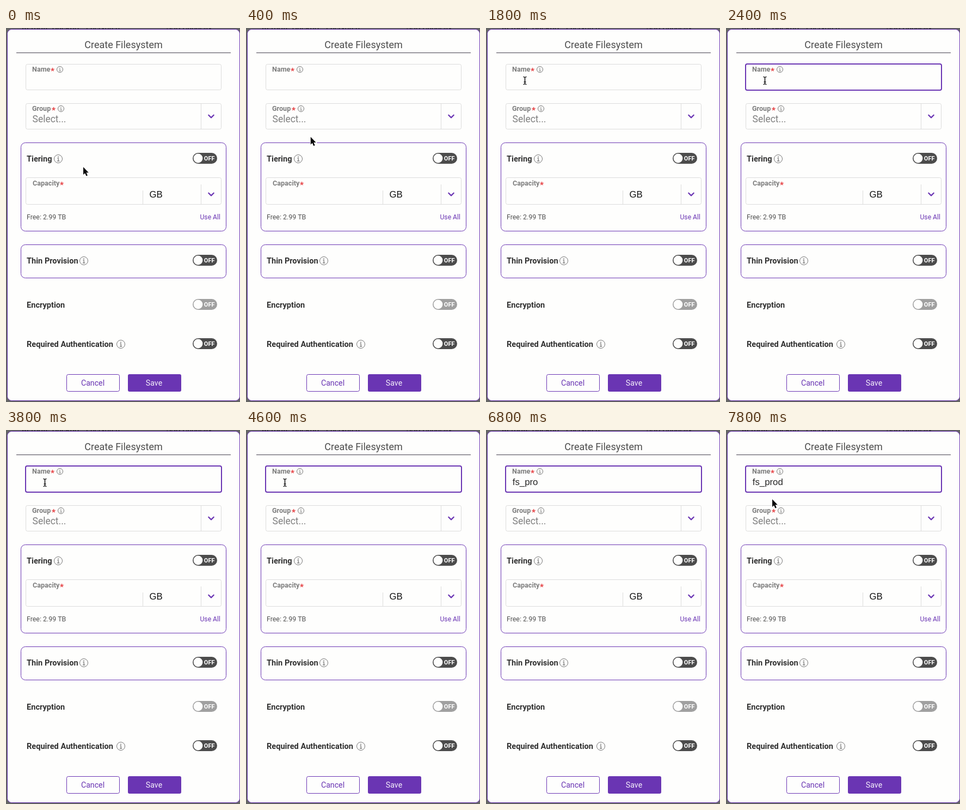
An HTML page with a canvas for the animation above (8000 ms loop, 430 by 686 pixels).

```html
<!DOCTYPE html>
<html lang="en">
<head>
<meta charset="utf-8">
<title>Create Filesystem</title>
<style>
  html, body { margin: 0; width: 100%; height: 100%; overflow: hidden; background: #656565; }
  canvas { display: block; width: 430px; height: 686px; }
</style>
</head>
<body>
<canvas id="stage"></canvas>
<script>
const W = 430, H = 686, LOOP = 8000, STEP = 200;
const PURPLE = '#6a35b3', DARK = '#4c4c4c', LABEL = '#7d7d7d', LINE = '#dcdcdc', PAPER = '#fefefd';
const UI = 'Roboto, "Open Sans", sans-serif';
const INPUT = '"Liberation Sans", Arial, sans-serif';

const canvas = document.getElementById('stage');
const ctx = canvas.getContext('2d');
const dpr = window.devicePixelRatio || 1;
canvas.width = W * dpr;
canvas.height = H * dpr;
ctx.scale(dpr, dpr);

function text(str, x, y, size, color, { weight = 400, family = UI, align = 'left' } = {}) {
  ctx.font = `${weight} ${size}px ${family}`;
  ctx.textAlign = align;
  ctx.fillStyle = color;
  ctx.fillText(str, x, y);
}

function box(x, y, w, h, r, { stroke, fill, width = 1 }) {
  ctx.beginPath();
  ctx.roundRect(x, y, w, h, r);
  if (fill) { ctx.fillStyle = fill; ctx.fill(); }
  if (stroke) { ctx.strokeStyle = stroke; ctx.lineWidth = width; ctx.stroke(); }
}

function polyline(points, color, width) {
  ctx.beginPath();
  points.forEach(([x, y]) => ctx.lineTo(x, y));
  ctx.strokeStyle = color;
  ctx.lineWidth = width;
  ctx.stroke();
}

function disc(x, y, r, color) {
  ctx.beginPath();
  ctx.arc(x, y, r, 0, Math.PI * 2);
  ctx.fillStyle = color;
  ctx.fill();
}

function info(x, y, r) {
  const s = r / 7.5;
  ctx.beginPath();
  ctx.arc(x, y, r, 0, Math.PI * 2);
  ctx.strokeStyle = '#777';
  ctx.lineWidth = 1;
  ctx.stroke();
  disc(x, y - 3.5 * s, 0.9 * s, '#666');
  polyline([[x - 1.6 * s, y - 1 * s], [x + 0.2 * s, y - 1 * s], [x + 0.2 * s, y + 4 * s]], '#666', 1.1 * s);
  polyline([[x - 2 * s, y + 4 * s], [x + 2.4 * s, y + 4 * s]], '#666', 1.1 * s);
}

function label(str, x, y, starX) {
  text(str, x, y, 12.6, LABEL, { weight: 700 });
  text('*', starX, y + 3.5, 15.5, '#e5383b', { weight: 700, align: 'center' });
}

function heading(str, y, iconX) {
  text(str, 38, y, 14.6, '#303030', { weight: 700 });
  if (iconX) info(iconX, y - 5, 7.5);
}

function chevron(x, y) {
  ctx.lineCap = ctx.lineJoin = 'round';
  polyline([[x - 4.7, y - 2.2], [x, y + 2.4], [x + 4.7, y - 2.2]], PURPLE, 2.3);
  ctx.lineCap = 'butt';
  ctx.lineJoin = 'miter';
}

function toggle(y, color) {
  box(343, y - 10, 45, 20, 10, { fill: color });
  disc(353, y, 8.4, PAPER);
  text('OFF', 373.7, y + 4, 11, '#fff', { weight: 700, align: 'center' });
}

function backdrop() {
  ctx.fillStyle = '#656565';
  ctx.fillRect(0, 0, W, H);
  text('Remote Backup', 29, 4, 15, '#2c2c2c');
  text('Encrypted', 147, 4, 14, '#2c2c2c');
  text('SSD Capacity', 295, 4, 14, '#2c2c2c');
  box(2.5, 2.5, 427, 681, 8, { fill: PAPER, stroke: PURPLE });
}

function form(focused, name) {
  text('Create Filesystem', 216, 37, 18, DARK, { align: 'center' });
  polyline([[19, 45.5], [413, 45.5]], '#45404f', 1);

  if (focused) box(36, 66, 360, 48, 3, { stroke: PURPLE, width: 2 });
  else box(36.5, 66.5, 359, 47, 3, { stroke: LINE });
  label('Name', 48, 80, 85.6);
  info(99, 76, 5.5);
  text(name, 48.8, 101, 16.8, '#262626', { family: INPUT });

  box(36.5, 138.5, 359, 47, 3, { stroke: LINE });
  polyline([[358.5, 138], [358.5, 186]], LINE, 1);
  label('Group', 48, 152, 87.6);
  info(101, 148, 5.5);
  text('Select...', 48.5, 173, 17.5, '#808080');
  chevron(377, 162);

  box(27.5, 210.5, 377, 162, 8, { stroke: PURPLE });
  heading('Tiering', 245, 96);
  toggle(239, DARK);
  box(36.5, 274.5, 359, 49, 3, { stroke: LINE });
  polyline([[251.5, 298], [251.5, 323]], LINE, 1);
  polyline([[358.5, 287], [358.5, 323]], LINE, 1);
  label('Capacity', 49, 289, 102.6);
  text('GB', 263.5, 311, 16.8, '#111', { family: INPUT });
  chevron(377, 305);
  text('Free: 2.99 TB', 38, 351, 12.4, '#505050');
  text('Use All', 394, 351, 12.2, PURPLE, { align: 'right' });

  box(27.5, 397.5, 377, 61, 8, { stroke: PURPLE });
  heading('Thin Provision', 432, 143);
  toggle(426, DARK);
  heading('Encryption', 513);
  toggle(507, '#a0a0a0');
  heading('Required Authentication', 585, 211);
  toggle(579, DARK);

  box(111.5, 635.5, 97, 31, 3, { stroke: PURPLE });
  text('Cancel', 159.5, 656, 14.2, PURPLE, { align: 'center' });
  box(224, 635, 98, 32, 3, { fill: PURPLE });
  text('Save', 272, 656, 14.2, '#f4effa', { align: 'center' });
}

function arrow(x, y) {
  const shape = [[0, 0], [0, 14], [3.1, 11.2], [5.5, 16.6], [7.9, 15.6], [5.6, 10.3], [9.8, 10.3]];
  ctx.beginPath();
  shape.forEach(([dx, dy]) => ctx.lineTo(x + dx, y + dy));
  ctx.closePath();
  ctx.strokeStyle = '#fff';
  ctx.lineWidth = 2;
  ctx.stroke();
  ctx.fillStyle = '#0a0a0a';
  ctx.fill();
}

function beam(x, y) {
  for (const [color, width] of [['#fff', 3], ['#111', 1.3]]) {
    polyline([[x - 3, y - 7], [x - 1.2, y - 6.7], [x, y - 5.5], [x, y + 5.5], [x - 1.2, y + 6.7], [x - 3, y + 7]], color, width);
    polyline([[x + 3, y - 7], [x + 1.2, y - 6.7], [x, y - 5.5], [x, y + 5.5], [x + 1.2, y + 6.7], [x + 3, y + 7]], color, width);
    polyline([[x - 2, y + 2.5], [x + 2, y + 2.5]], color, width);
  }
}

const KEY_TIMES = [5600, 5800, 6000, 6400, 6600, 6800, 7000];

function pointer(t) {
  if (t < 1200) {
    const p = Math.min(t / 1000, 1);
    const e = p * p * (3 - 2 * p);
    arrow(142 - 66 * e, 255 - 157 * e);
  } else if (t < KEY_TIMES[0]) {
    beam(71.5, 96.5);
  } else if (t >= 7800) {
    arrow(85, 127);
  } else if (t >= 7600) {
    beam(80, 106);
  }
}

function draw(now) {
  const t = Math.floor((now % LOOP) / STEP) * STEP;
  const typed = KEY_TIMES.filter(k => k <= t).length;
  backdrop();
  form(t >= 2200, 'fs_prod'.slice(0, typed));
  pointer(t);
}

const start = performance.now();
function tick() {
  draw(performance.now() - start);
  requestAnimationFrame(tick);
}
tick();
</script>
</body>
</html>
```
